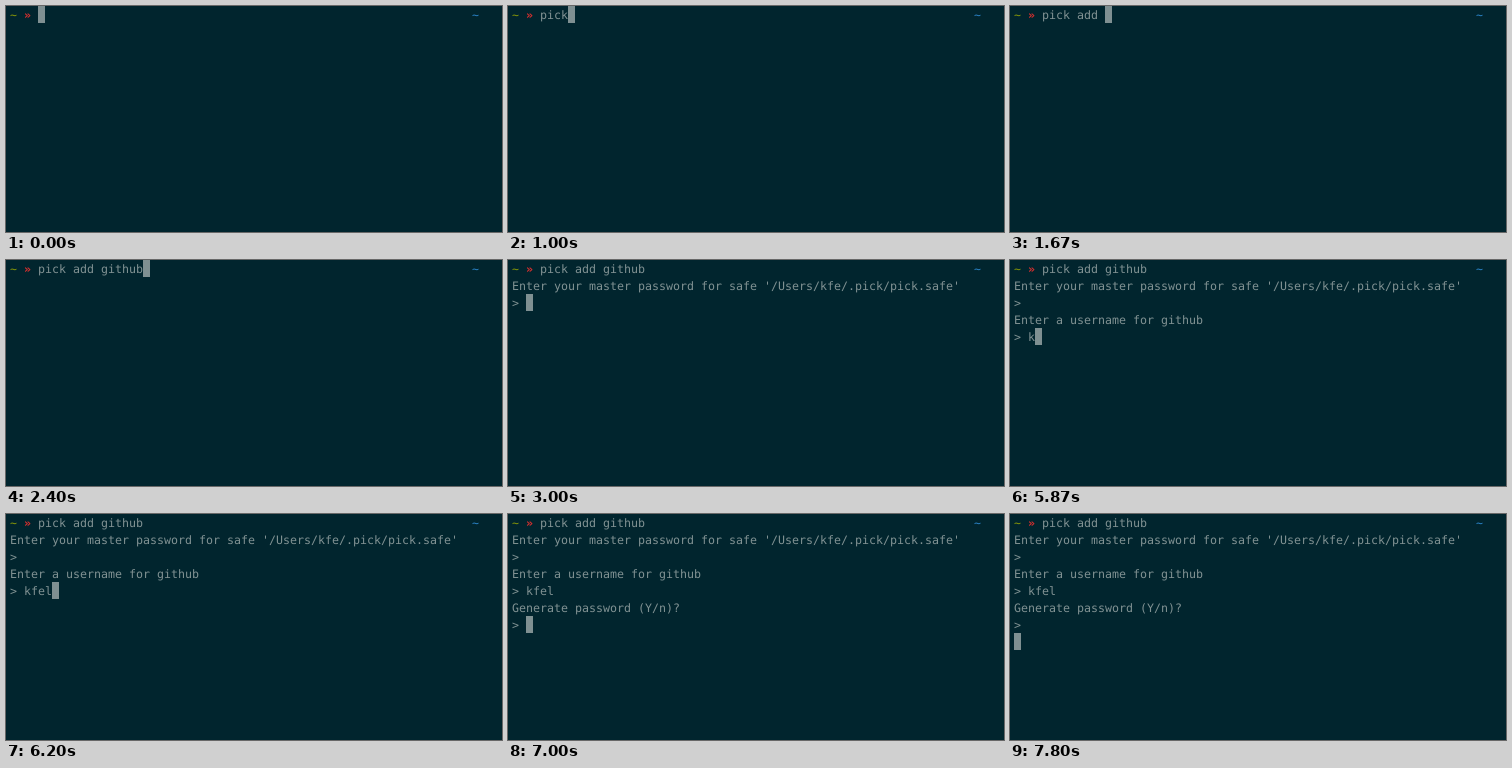
These frames come from a looping animation (496 px wide and 226 px high, 8 s). An HTML page:

```html
<!DOCTYPE html>
<html lang="en">
<head>
<meta charset="utf-8">
<title>Terminal</title>
<style>
  html, body { margin: 0; width: 100%; height: 100%; overflow: hidden; background: #01252e; }
  svg { display: block; width: 496px; height: 226px; }
  text {
    font: 11.63px "DejaVu Sans Mono", monospace;
    fill: #819293;
    white-space: pre;
    text-rendering: geometricPrecision;
  }
  .home { fill: #8a9a08; }
  .arrow { fill: #d5302f; font-weight: bold; }
  .path { fill: #2c86cc; }
</style>
</head>
<body>
<svg viewBox="0 0 496 226">
  <rect width="496" height="226" fill="#01252e"/>
  <rect id="cursor" width="7" height="17" fill="#7f9092"/>
  <g id="screen"></g>
</svg>
<script>
const LOOP = 8000, LEFT = 4, CELL = 7, ROW = 17, BASE = 13;
const COMMAND = "pick add github", USER = "kfel", PROMPT_COL = 4;

// When each further character appears
const commandKeys = [800, 800, 1000, 1000, 1130, 1200, 1400, 1530,
                     1670, 1800, 1870, 2000, 2130, 2270, 2400];
const userKeys = [5870, 6000, 6070, 6200];

const screen = document.getElementById("screen");
const cursor = document.getElementById("cursor");

function addText(col, row, str = "", cls = "") {
  const el = document.createElementNS("http://www.w3.org/2000/svg", "text");
  el.setAttribute("x", LEFT + col * CELL);
  el.setAttribute("y", BASE + row * ROW);
  el.setAttribute("class", cls);
  el.textContent = str;
  screen.append(el);
  return el;
}

addText(0, 0, "~", "home");
addText(2, 0, "»", "arrow");
addText(66, 0, "~", "path");
const command = addText(PROMPT_COL, 0);
const user = addText(2, 4);

const output = [
  [2800, 1, "Enter your master password for safe '/Users/kfe/.pick/pick.safe'"],
  [2800, 2, ">"],
  [5000, 3, "Enter a username for github"],
  [5000, 4, ">"],
  [6530, 5, "Generate password (Y/n)?"],
  [6530, 6, ">"]
].map(([at, row, str]) => ({ at, el: addText(0, row, str) }));

const typed = (keys, t) => keys.filter(k => k <= t).length;

function cursorCell(t) {
  if (t < 2800) return [PROMPT_COL + typed(commandKeys, t), 0];
  if (t < 4800) return [2, 2];
  if (t < 5000) return [0, 3];
  if (t < 6530) return [2 + typed(userKeys, t), 4];
  if (t < 7800) return [2, 6];
  return [0, 7];
}

function render(t) {
  command.textContent = COMMAND.slice(0, typed(commandKeys, t));
  user.textContent = USER.slice(0, typed(userKeys, t));
  for (const { at, el } of output) {
    el.setAttribute("visibility", t >= at ? "visible" : "hidden");
  }
  const [col, row] = cursorCell(t);
  cursor.setAttribute("x", LEFT + col * CELL);
  cursor.setAttribute("y", row * ROW);
}

const start = performance.now();
function tick() {
  render((performance.now() - start) % LOOP);
  requestAnimationFrame(tick);
}
tick();
</script>
</body>
</html>
```
